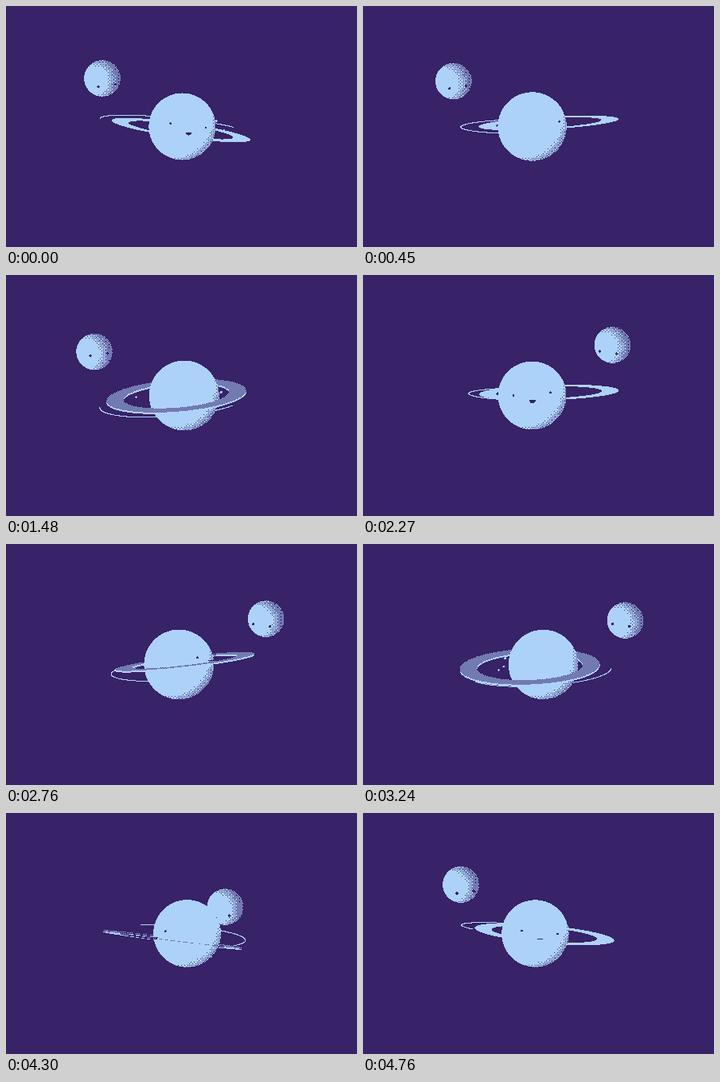
These frames come from a looping animation (441 px wide and 303 px high, 4790 ms). An HTML page with a canvas:

```html
<!DOCTYPE html>
<html lang="en">
<head>
<meta charset="utf-8">
<title>Hula planet</title>
<style>
  html, body { margin: 0; width: 100%; height: 100%; overflow: hidden; background: #382268; }
  canvas { display: block; width: 441px; height: 303px; image-rendering: pixelated; }
</style>
</head>
<body>
<canvas id="stage" width="441" height="303"></canvas>
<script>
const W = 441, H = 303, LOOP = 4790, STEPS = 158, HALF = 79;
const { PI, sin, cos, abs, hypot, floor, max, min } = Math;
const RAD = PI / 180;
const ctx = document.getElementById('stage').getContext('2d');
const img = ctx.createImageData(W, H);
const px = new Uint32Array(img.data.buffer);
const rgb = (r, g, b) => (255 << 24 | b << 16 | g << 8 | r) >>> 0;
const DARK = rgb(56, 34, 104), LIGHT = rgb(173, 210, 250);
const BAYER = [0, 8, 2, 10, 12, 4, 14, 6, 3, 11, 1, 9, 15, 7, 13, 5];

// Moon path for one crossing: step, distance past the centre, height
const PATH = [
  [0, -109.5, 96.5], [6, -95, 108], [12, -15, 128], [16, 55, 102],
  [19, 86, 87], [21, 93, 88], [24, 97.5, 90], [26, 99.5, 91],
  [36, 106, 94], [53, 109, 96], [79, 109.5, 96.5]
];

function along(path, q) {
  const i = max(1, path.findIndex(p => p[0] >= q));
  const a = path[i - 1], b = path[i], f = (q - a[0]) / (b[0] - a[0]);
  return [a[1] + (b[1] - a[1]) * f, a[2] + (b[2] - a[2]) * f];
}

// shade(dx, dy) gives a lightness from 0 to 1, or -1 for outside
function paint(cx, cy, rx, ry, shade) {
  for (let y = max(0, floor(cy - ry)); y <= min(H - 1, cy + ry); y++) {
    for (let x = max(0, floor(cx - rx)); x <= min(W - 1, cx + rx); x++) {
      const v = shade(x + 0.5 - cx, y + 0.5 - cy);
      if (v < 0) continue;
      const limit = (BAYER[(y & 3) * 4 + (x & 3)] + 0.5) / 16;
      px[y * W + x] = v > limit ? LIGHT : DARK;
    }
  }
}

function ball(cx, cy, r, lx, ly, from, to, low) {
  paint(cx, cy, r + 1, r + 1, (dx, dy) => {
    if (hypot(dx, dy) > r) return -1;
    const f = (hypot(dx - lx, dy - ly) - from) / (to - from);
    return 1 - (1 - low) * min(1, max(0, f));
  });
}

function dot(cx, cy, r, v) {
  paint(cx, cy, r + 1, r + 1, (dx, dy) => hypot(dx, dy) > r ? -1 : v);
}

// part: -1 far half, 1 near half, 0 whole
function band(ring, drop, v, part) {
  const c = cos(ring.tilt), s = sin(ring.tilt), b = max(2, abs(ring.open));
  paint(ring.x, ring.y + drop, 90, b + 16, (dx, dy) => {
    const u = dx * c + dy * s, w = dy * c - dx * s;
    if (w * part < 0) return -1;
    const q = (u / 88) ** 2 + (w / b) ** 2;
    return q > 1 || q < 0.57 ? -1 : v;
  });
}

function drawRing(ring, part) {
  if (ring.open > 0) {
    band(ring, 2, 1, part);
    band(ring, 0, 0.5, part);
  } else if (part < 0) {
    band(ring, 0, 1, 0);
  }
}

function hoop(n, p) {
  const chi = n * 5 * 360 / HALF * RAD;
  const cx = 216 - 8.5 * cos(chi - 50 * RAD);
  const cy = 154.5 - 5 * sin(p) - 4 * cos(p);
  const b = 12.5 - 3.5 * sin(p) - 4 * cos(p);
  const tilt = (0.5 + 5 * sin(p)) * RAD;
  const mid = p + (190 - 30 * sin(p)) * RAD;
  for (let a = -75; a <= 75; a += 0.4) {
    const k = mid + a * RAD, u = 90 * cos(k), w = b * sin(k);
    const x = floor(cx + u * cos(tilt) - w * sin(tilt));
    const y = floor(cy + u * sin(tilt) + w * cos(tilt));
    px[y * W + x] = LIGHT;
  }
}

// Each rock: start angle, orbit radius, size, turns per half loop
const ROCKS = [[302, 54, 1.5, 5], [252, 44, 1.2, 5], [0, 57, 1.3, 4]];

function rocks(n, near) {
  for (const [start, r, size, turns] of ROCKS) {
    const a = (start + n * turns * 360 / HALF) * RAD;
    if (sin(a) > 0 === near) dot(220 + r * cos(a), 152 + 13 * sin(a), size, 1);
  }
}

function face(n, p, x, y, r) {
  const k = n % HALF;
  const yaw = ((k - 77.2) * 360 / HALF + 10 * cos(p)) * RAD;
  const roll = (12 * sin(p) - 5) * RAD;
  const place = (lon, h) => {
    const a = lon * RAD + yaw;
    if (cos(a) < 0.15) return null;
    const u = r * sin(a);
    return [x + u * cos(roll) - h * sin(roll), y + u * sin(roll) + h * cos(roll)];
  };
  for (const lon of [-33, 33]) {
    const eye = place(lon, -2);
    if (eye) dot(eye[0], eye[1], 1.4, 0);
  }
  const mouth = place(0, 6);
  if (!mouth) return;
  const deep = k % 6 ? 4 : 1;
  paint(mouth[0], mouth[1], 5, 5, (dx, dy) =>
    dy < 0 || (dx / 3.8) ** 2 + (dy / deep) ** 2 > 1 ? -1 : 0);
}

function moon(n) {
  const m = (n + 25) % STEPS, q = m % HALF, dir = m < HALF ? -1 : 1;
  const [off, y] = along(PATH, q);
  const x = 220.5 + dir * off;
  ball(x, y, 22.8, -12, 3, 18, 32, 0.42);
  const look = 9.5 - 0.12 * max(0, q - 25);
  const side = off < 0 ? -dir : dir;
  dot(x - side * 5.5 - 10.5, y + look - side * 1.5, 1.6, 0);
  dot(x - side * 5.5 + 10.5, y + look + side * 1.5, 1.6, 0);
}

function draw(n) {
  px.fill(DARK);
  const p = (n * 4 * 360 / HALF + 76) * RAD;
  const c = cos(p), s = sin(p);
  const x = 220.8 - 8.3 * c, y = 151.5, r = 43 - s;
  const ring = {
    x: x + 22 * c + s - 1,
    y: 152.6 - 5.2 * c + 3 * s,
    tilt: (0.9 - 2.85 * c + 6.9 * s) * RAD,
    open: 2.5 - 11.8 * c - 12.2 * s + 3 * sin(2 * p)
  };
  moon(n);
  hoop(n, p);
  drawRing(ring, -1);
  rocks(n, false);
  ball(x, y, r, -12, -11, 49, 60, 0.5);
  face(n, p, x, y, r);
  drawRing(ring, 1);
  rocks(n, true);
  ctx.putImageData(img, 0, 0);
}

let shown = -1;
function tick() {
  const t = performance.now() % LOOP;
  const n = min(STEPS - 1, max(1, floor(t / LOOP * STEPS + 0.2)));
  if (n !== shown) draw(shown = n);
  requestAnimationFrame(tick);
}
tick();
</script>
</body>
</html>
```
